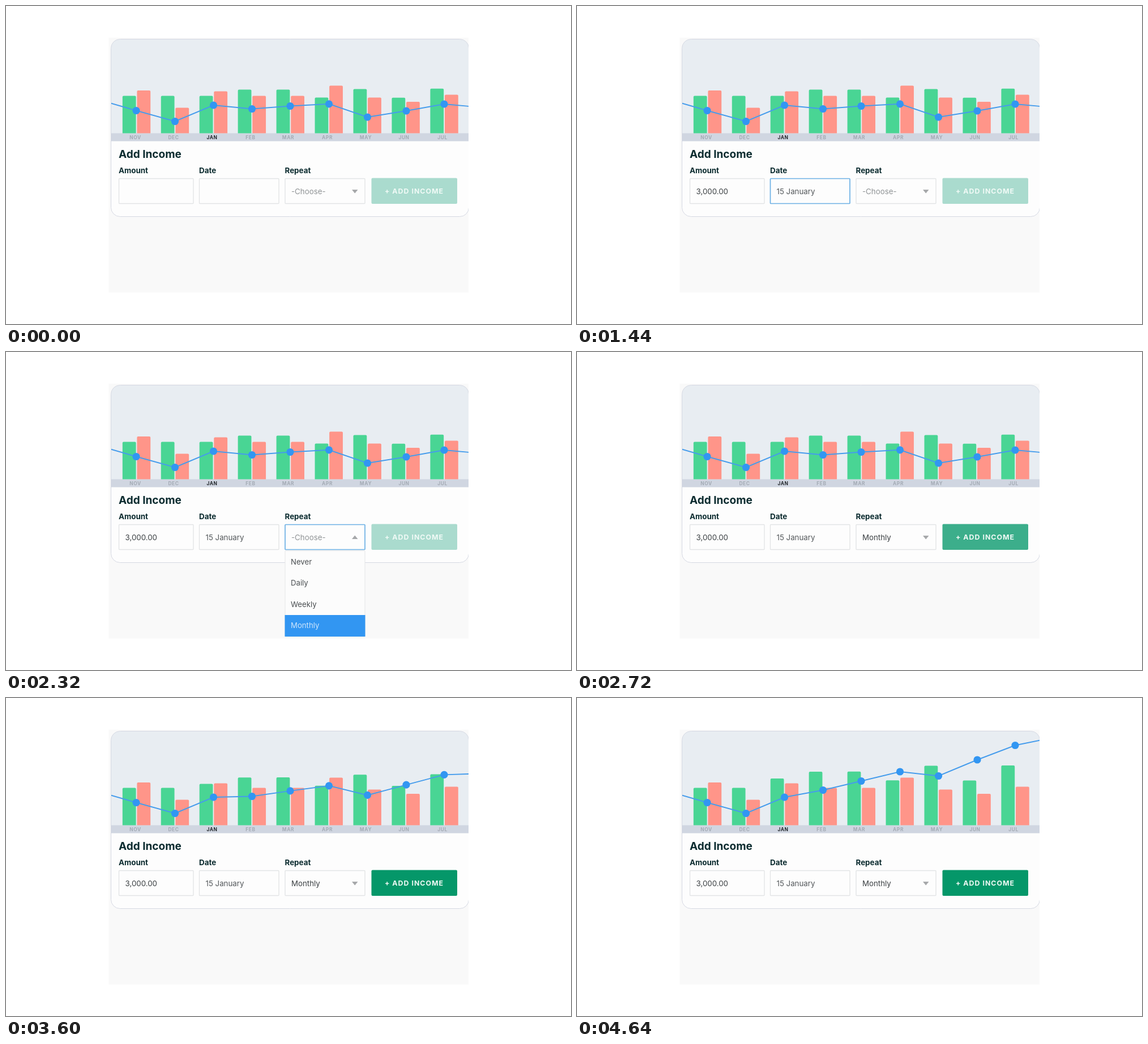
Write an HTML page with a canvas that moves like this. It is 998 px wide and 561 px high and loops after 4720 ms.

```html
<!DOCTYPE html>
<html lang="en">
<head>
<meta charset="utf-8">
<title>Add Income</title>
<style>
  html, body { margin: 0; width: 100%; height: 100%; overflow: hidden; background: #fff; }
  canvas { display: block; }
</style>
</head>
<body>
<canvas id="stage" width="998" height="561"></canvas>
<script>
const ctx = document.getElementById('stage').getContext('2d');
const LOOP = 4720, STEP = 80;
const BLUE = '#3296f2', INK = '#0b2b2f', VALUE = '#3c4144', MUTED = '#8f9395';

// label, label centre, green top before and after, red top, marker x, marker y before and after
const months = [
  ['NOV', 228.5, 158.5, 158.5, 149, 230, 184.5, 184.5],
  ['DEC', 296, 158.5, 158.5, 179.5, 298.5, 203.5, 203.5],
  ['JAN', 364, 158.5, 142, 150.5, 366.5, 175, 175],
  ['FEB', 432, 147.5, 130, 158.5, 434.5, 181.5, 162.5],
  ['MAR', 498.5, 147.5, 129.8, 158.5, 502, 176.5, 146.5],
  ['APR', 567.5, 161.5, 145.3, 140.5, 570.5, 172.8, 130],
  ['MAY', 635.5, 146.5, 119.5, 161.5, 638.5, 196, 137.5],
  ['JUN', 703, 161.7, 145.5, 169, 707, 185, 109],
  ['JUL', 771, 145.7, 119, 156.5, 774, 173, 83.5]
];
const options = ['Never', 'Daily', 'Weekly', 'Monthly'];

const clamp = v => Math.min(1, Math.max(0, v));
const progress = (t, from, to) => clamp((t - from) / (to - from));
const ease = p => p < .5 ? 2 * p * p : 1 - 2 * (1 - p) ** 2;
const mix = (a, b, p) => a + (b - a) * p;
const typed = (text, t, from, to) => text.slice(0, Math.round(text.length * progress(t, from, to)));

function rect(x, y, w, h, fill, radius = 0, stroke, line = 1) {
  ctx.beginPath();
  ctx.roundRect(x, y, w, h, radius);
  if (fill) { ctx.fillStyle = fill; ctx.fill(); }
  if (stroke) { ctx.strokeStyle = stroke; ctx.lineWidth = line; ctx.stroke(); }
}

function text(str, x, y, size, color, { weight = 400, align = 'left', spacing = 0 } = {}) {
  ctx.font = `${weight} ${size}px Inter, sans-serif`;
  ctx.letterSpacing = spacing + 'px';
  ctx.textAlign = align;
  ctx.fillStyle = color;
  ctx.fillText(str, x, y);
}

function drawChart(grow) {
  ctx.save();
  ctx.beginPath();
  ctx.roundRect(185.5, 58.5, 632, 313, 16);
  ctx.clip();
  rect(185, 58, 633, 167, '#e8edf2');
  rect(185, 224.5, 633, 14, '#d0d6e1');

  months.forEach(([name, labelX, before, after, redTop], i) => {
    const x = 205.8 + i * 67.95, top = mix(before, after, grow);
    rect(x, top, 23.8, 224.5 - top, '#49d594', [2, 2, 0, 0]);
    rect(x + 25.6, redTop, 23.8, 224.5 - redTop, '#ff9589', [2, 2, 0, 0]);
    text(name, labelX, 235, 8.4, name === 'JAN' ? '#22272c' : '#a4abb5',
      { weight: 700, align: 'center', spacing: .6 });
  });

  const points = months.map(m => [m[5], mix(m[6], m[7], grow)]);
  ctx.beginPath();
  ctx.moveTo(185, 171.5);
  points.forEach(p => ctx.lineTo(...p));
  ctx.lineTo(818, mix(177, 74.5, grow));
  ctx.strokeStyle = '#459cec';
  ctx.lineWidth = 1.9;
  ctx.stroke();
  ctx.fillStyle = BLUE;
  for (const [x, y] of points) {
    ctx.beginPath();
    ctx.arc(x, y, 6.6, 0, 7);
    ctx.fill();
  }
  ctx.restore();
}

function field(label, x, w, value, color, focused) {
  text(label, x, 294.5, 13.4, INK, { weight: 700 });
  rect(x + .5, 304.5, w - 1, 44, '#fdfdfd', 1, focused ? '#6cb0e4' : '#e2e4e5', focused ? 1.7 : 1.3);
  text(value, x + 11.5, 331.5, 13.3, color);
}

function arrow(up) {
  const base = up ? 330 : 324, tip = up ? 323.5 : 330.5;
  ctx.beginPath();
  ctx.moveTo(611, base);
  ctx.lineTo(621.5, base);
  ctx.lineTo(616.2, tip);
  ctx.fillStyle = '#a6a8aa';
  ctx.fill();
}

function drawMenu(active) {
  rect(493, 350.5, 141, 151.5, '#fcfcfc', 1, '#e5e6e7');
  options.forEach((name, i) => {
    const on = i === active;
    if (on) rect(492.5, 351 + i * 37.7, 142, 38, BLUE);
    text(name, 503, 374.8 + i * 37.5, 13.2, on ? '#cfe6fc' : '#4a4e51');
  });
}

function draw(t) {
  const open = t >= 1560 && t < 2560, chosen = t >= 2560;
  rect(0, 0, 998, 561, '#fff');
  ctx.save();
  ctx.beginPath();
  ctx.rect(181.5, 56, 635.5, 449.5);
  ctx.clip();
  rect(181, 56, 637, 450, '#f9f9f9');
  rect(185.5, 58.5, 632, 313, '#fdfdfd', 16);
  drawChart(ease(progress(t, 3380, 3860)));
  rect(185.5, 58.5, 632, 313, null, 16, '#d5d8e2');

  text('Add Income', 199, 268, 19, INK, { weight: 700 });
  field('Amount', 199, 132.5, typed('3,000.00', t, 160, 560), VALUE, t >= 120 && t < 800);
  field('Date', 341, 141.5, typed('15 January', t, 880, 1360), '#54585b', t >= 800 && t < 1520);
  field('Repeat', 492.5, 142, chosen ? 'Monthly' : '-Choose-', chosen ? VALUE : MUTED, open);
  arrow(open);

  const ready = progress(t, 2560, 2800);
  const [r, g, b] = [[170, 5], [219, 151], [206, 105]].map(([from, to]) => mix(from, to, ready));
  rect(645.5, 303.5, 151.5, 45.5, `rgb(${r} ${g} ${b})`, 2);
  text('+ ADD INCOME', 669, 330.8, 12.4, '#f0faf6', { weight: 700, spacing: 1 });

  if (open) drawMenu(t < 2080 ? 0 : t < 2200 ? 1 : t < 2320 ? 2 : 3);
  ctx.restore();
}

const start = performance.now();
function tick() {
  const t = (performance.now() - start) % LOOP;
  draw(Math.floor(t / STEP) * STEP);
  requestAnimationFrame(tick);
}
tick();
</script>
</body>
</html>
```
